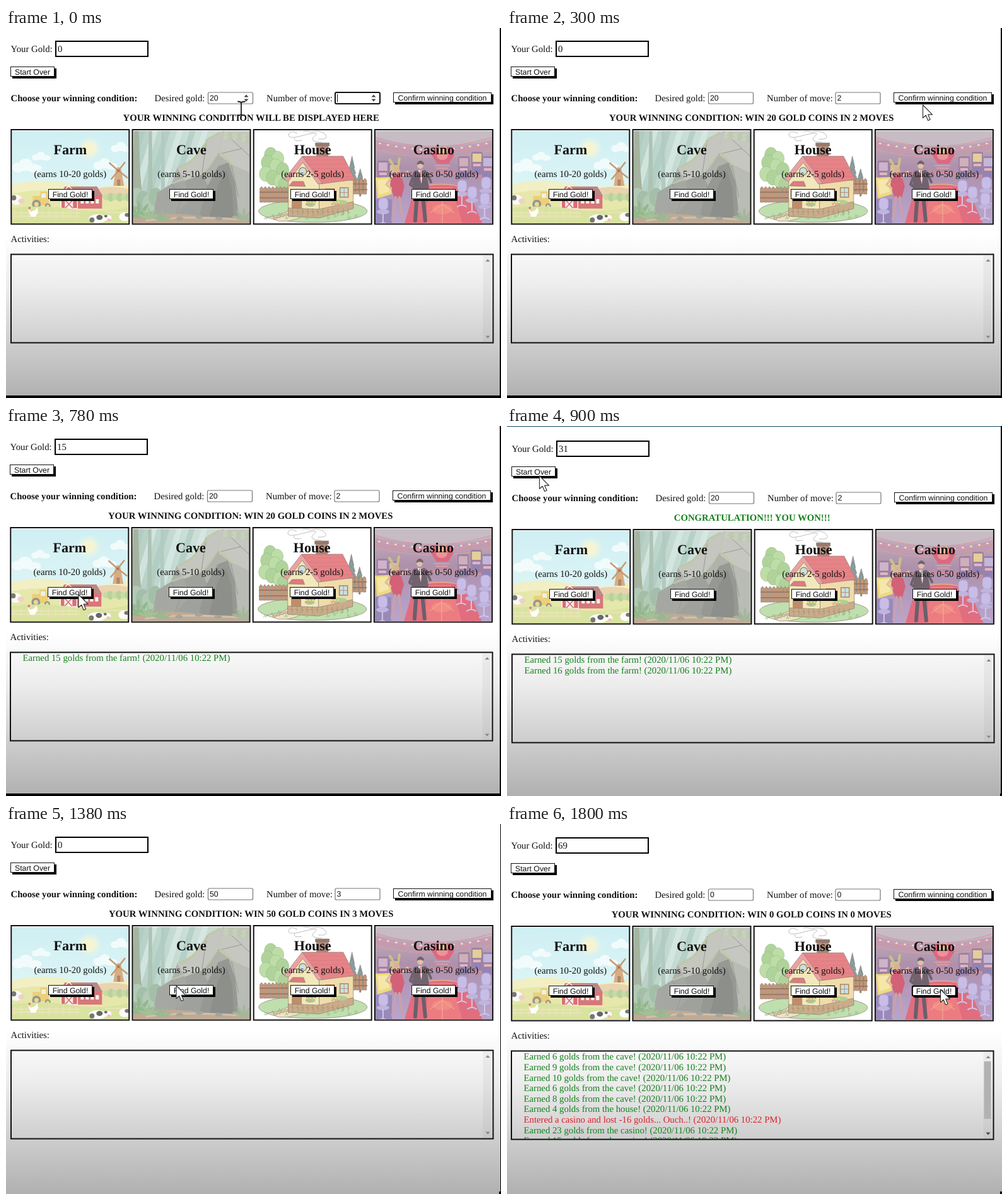
Recreate the animation shown at these times as an HTML page. Size 785 by 586 pixels, loop 2.1 s.

```html
<!DOCTYPE html>
<html lang="en">
<head>
<meta charset="utf-8">
<title>Gold game</title>
<style>
html, body { margin: 0; width: 100%; height: 100%; overflow: hidden; background: #fff; }
svg { display: block; width: 785px; height: 586px; }
text { font: 14.75px "Liberation Serif", Times, serif; fill: #111; text-rendering: geometricPrecision; white-space: pre; }
.b { font-weight: bold; }
.h { font-size: 22.1px; font-weight: bold; }
.ui { font: 12.3px "Liberation Sans", Arial, sans-serif; }
.mid { text-anchor: middle; }
.line { fill: none; stroke-linecap: round; stroke-linejoin: round; }
</style>
</head>
<body>
<svg viewBox="0 0 785 586">
  <defs>
    <linearGradient id="shade" x1="0" y1="0" x2="0" y2="1">
      <stop offset=".56" stop-color="#fff"/><stop offset=".7" stop-color="#ececec"/>
      <stop offset=".85" stop-color="#cecece"/><stop offset="1" stop-color="#b0b0b0"/>
    </linearGradient>
    <linearGradient id="sky" x1="0" y1="0" x2="0" y2="1">
      <stop offset="0" stop-color="#cfeff4"/><stop offset="1" stop-color="#def5f5"/>
    </linearGradient>
    <radialGradient id="sun">
      <stop offset="0" stop-color="#fbf3c4"/><stop offset=".4" stop-color="#f3f5d8"/>
      <stop offset="1" stop-color="#e4f5e8" stop-opacity="0"/>
    </radialGradient>
    <linearGradient id="jungle">
      <stop offset="0" stop-color="#b4cfc4"/><stop offset=".5" stop-color="#cbe0d9"/><stop offset="1" stop-color="#c9d3cb"/>
    </linearGradient>
    <linearGradient id="hall" x1="0" y1="0" x2="0" y2="1">
      <stop offset="0" stop-color="#b3a3b0"/><stop offset=".4" stop-color="#9a7596"/><stop offset="1" stop-color="#a78fc2"/>
    </linearGradient>
    <clipPath id="logClip"><rect x="9" y="359" width="747" height="139"/></clipPath>
    <clipPath id="cardClip"><rect x="2" y="2.5" width="185" height="146.5"/></clipPath>
  </defs>

  <rect width="785" height="586" fill="url(#shade)"/>
  <g id="page">
    <text x="7.5" y="38">Your Gold:</text>
    <rect x="79" y="21" width="146" height="24" fill="#fff" stroke="#000" stroke-width="2"/>
    <text id="gold" x="82" y="38"></text>
    <text class="b" x="7.5" y="115.5">Choose your winning condition:</text>
    <text x="235.5" y="115.5">Desired gold:</text>
    <text x="413" y="115.5">Number of move:</text>
    <rect x="320.5" y="102" width="71" height="18" rx="2" fill="#fff" stroke="#767676" stroke-width="1.2"/>
    <rect id="moveBox" x="522" y="102" width="71" height="18" rx="2" fill="#fff"/>
    <text id="want" class="ui" x="323" y="115.3"></text>
    <text id="moves" class="ui" x="524.5" y="115.3"></text>
    <g id="typing">
      <path d="M525.5 104.5v13" stroke="#111"/>
      <path id="spin" d="M377.5 109.5l3.5-4 3.5 4zM377.5 112.5l3.5 4 3.5-4z" fill="#444"/>
      <use href="#spin" x="202"/>
    </g>
    <text id="goal" class="b mid" x="388.7" y="146.5"></text>
    <g id="cards"></g>
    <g id="buttons"></g>
    <rect id="pressed" x="643.8" y="255.8" width="69" height="15.5" rx="2.5" fill="none" stroke="#000" stroke-width="2"/>
    <text x="7.5" y="339">Activities:</text>
    <rect x="756.5" y="360" width="12.5" height="137" fill="#777" opacity=".09"/>
    <rect id="thumb" x="757.5" y="375" width="11" height="91" fill="#b2b2b2"/>
    <path d="M760.5 370l3.5-4 3.5 4z" fill="#888"/>
    <path id="down" d="M760.5 487.5l3.5 4 3.5-4z"/>
    <g id="log" clip-path="url(#logClip)"></g>
    <rect x="8" y="358.5" width="764.5" height="140" fill="none" stroke="#111" stroke-width="2"/>
  </g>
  <rect id="top" width="785" height="1.2" fill="#2b6079"/>
  <rect id="right" width="2" height="586"/>
  <rect id="bottom" y="582" width="785" height="4"/>
  <rect x="782" y="582" width="3" height="4"/>
  <path id="arrow" d="M0 0V20.5L4.7 16.3 8.2 24.5 11.6 23 8.2 15.2H15z" fill="#fff" stroke="#333" stroke-width="1.2" stroke-linejoin="round"/>
  <path id="beam" class="line" d="M-5-11Q-1-11 0-9Q1-11 6-11M0-9V9M-5 11Q-1 11 0 9Q1 11 6 11" stroke="#222" stroke-width="1.8"/>
</svg>

<script>
const $ = id => document.getElementById(id);
const range = n => [...Array(n).keys()];
const box = (x, y, w, h, fill, more = "") => `<rect x="${x}" y="${y}" width="${w}" height="${h}" fill="${fill}" ${more}/>`;
const oval = (x, y, rx, ry, fill, more = "") => `<ellipse cx="${x}" cy="${y}" rx="${rx}" ry="${ry}" fill="${fill}" ${more}/>`;
const shape = (d, fill, more = "") => `<path d="${d}" fill="${fill}" ${more}/>`;
const line = (d, color, w = 1) => `<path class="line" d="${d}" stroke="${color}" stroke-width="${w}"/>`;
const wash = (art, opacity) => `<g opacity="${opacity}">${art}</g>`;

// Card pictures, drawn from the card's top left corner
function farm() {
  const cloud = (x, y, s) => `<g transform="translate(${x} ${y}) scale(${s})">` +
    oval(0, 0, 9, 7, "#f2fbfb") + oval(11, -4, 10, 9, "#f2fbfb") + oval(23, 1, 11, 6, "#f2fbfb") + "</g>";
  const wheel = (x, y, r) => oval(x, y, r, r, "#96968e") + oval(x, y, r * .5, r * .5, "#ecd896");
  const cow = (x, y) => oval(x, y, 14, 7, "#fcfcfa") + oval(x + 3, y - 2, 5, 4, "#666") +
    oval(x - 9, y + 2, 4, 4, "#777") + oval(x + 17, y - 1, 5, 5, "#fafafa") + oval(x + 18, y + 2, 3, 2.5, "#efc3bd") +
    oval(x + 13, y - 4, 2.5, 2, "#666");
  return box(2, 3, 186, 100, "url(#sky)") + oval(125, 31, 21, 20, "url(#sun)") +
    cloud(12, 61, 1.1) + cloud(40, 45, .7) + cloud(139, 58, .9) + cloud(166, 31, .8) +
    shape("M2 88Q45 76 95 87T188 84V150H2z", "#f1efc3") +
    shape("M2 102Q55 92 105 103T188 99V150H2z", "#e6e7ab") +
    shape("M130 96Q160 88 188 95V110H130z", "#e9d4ae") +
    shape("M163 90L167 63Q171 58 175 63L180 90z", "#d9ad82") + box(169, 80, 5, 10, "#b0866e") +
    [[157, 54], [181, 53], [160, 79], [185, 77]].map(p => line(`M171 66L${p}`, "#c69a74", 2.5)).join("") +
    oval(171, 66, 2, 2, "#9b765d") +
    range(6).map(i => oval(152 + i * 7, 108, 5, 5 + i % 2 * 2, i % 2 ? "#b8d29c" : "#c8daa5")).join("") +
    shape("M78 106L86 91H137L146 106z", "#bd8688") + box(80, 105, 65, 21, "#d8777b") +
    shape("M80 126V104L92 90 106 104V126z", "#d86f74", `stroke="#fff0ef" stroke-width="1.4"`) +
    box(86, 112, 13, 14, "#fbe9e6") + line("M87 113l11 12m0-12l-11 12", "#d06c73", 1.5) +
    range(4).map(i => box(111 + i * 8, 111, 5, 7, "#faf0ea")).join("") +
    shape("M35 106H47V99H58L61 115 57 121H35z", "#edcf78") + box(49, 102, 7, 7, "#e5f3ee") +
    wheel(41, 119, 7) + wheel(59, 122, 4.5) +
    shape("M2 125Q50 119 100 127T188 123V150H2z", "#d9e3a0") +
    line("M2 133H110M2 138H110M150 132H188", "#efe6bd", 1.5) +
    range(10).map(i => box(5 + i * 11, 129, 2.2, 13, "#ece0b9")).join("") +
    oval(9, 112, 9, 8, "#f9f9f6") + oval(5, 109, 4, 4, "#777") + oval(17, 114, 5, 4, "#efd0c8") +
    shape("M28 127l4 4 6-2 4-5 2 7-5 8h-7z", "#fffdf8") + oval(30, 125, 2, 2, "#e57d72") +
    cow(138, 142) + oval(181, 139, 9, 7, "#fbfbfa") + oval(185, 136, 4, 3, "#777");
}

function cave() {
  const leaf = (x, y, s, c) => range(5).map(i => oval(x, y - s, s * .22, s, c, `transform="rotate(${i * 35 - 70} ${x} ${y})"`)).join("");
  return box(2, 3, 186, 147, "url(#jungle)") +
    range(6).map(i => shape(`M${12 + i * 20} 3h9L${i * 19 - 14} 130h-12z`, i % 2 ? "#dcece7" : "#aecbc1", `opacity=".7"`)).join("") +
    shape("M4 3h7l2 60 5 65H2V60z", "#a5b39f") + shape("M27 3h5l1 122h-8z", "#adc3b5") + shape("M47 3h4l2 100h-7z", "#b2cabf") +
    range(8).map(i => oval(8 + i * 10, 108 + i % 3 * 5, 11, 15, i % 2 ? "#a3bfa8" : "#b2cab5")).join("") +
    shape("M33 145L40 101 63 87 72 61 98 47 119 17 145 4H188V148H33z", "#b0b2ac") +
    shape("M72 61L98 47 119 17 145 4 137 40 111 72 84 82z", "#c4c6bf") +
    shape("M145 4H188V70L158 56 137 40z", "#c5c7c0") + shape("M158 56L188 70V145H169z", "#b9bbb5") +
    shape("M40 101L63 87 84 82 91 112 67 143H33z", "#a5a8a2") + shape("M84 82L111 72 125 98 107 139H67L91 112z", "#9fa29c") +
    shape("M107 139L119 92 137 59 153 53 164 85 170 145z", "#969893") +
    shape("M123 139L137 88 150 65 159 93 162 145z", "#8d8f8a") +
    line("M119 17L111 72M63 87L79 109 67 143M137 40L174 31M145 4L174 31 188 44M158 56L169 107", "#969a94", 1) +
    line("M76 60Q88 58 98 47T119 20M122 15L139 6M140 38Q151 48 159 56", "#c0c9a2", 3) +
    line("M65 86L82 79M111 71Q123 62 134 42", "#bdc8a9", 2) +
    range(12).map(i => oval(150 + i % 6 * 7, 7 + i, 5, 3, i % 2 ? "#bdc9b0" : "#c8d0bc")).join("") +
    shape("M2 139Q60 130 105 138T188 139V150H2z", "#bfaa95") + line("M23 145Q85 136 180 144", "#d0c0aa", 3) +
    range(5).map(i => oval(45 + i * 31, 139 + i % 2 * 3, 6, 3, "#a4a59b")).join("") +
    leaf(11, 140, 13, "#92b78b") + leaf(27, 142, 9, "#a2c197") + leaf(48, 145, 8, "#9ab893") + leaf(178, 145, 10, "#a4b79a");
}

function house() {
  const ink = `stroke="#8a8074" stroke-width=".7" stroke-linejoin="round"`;
  const fence = (x, y, n) => range(n).map(i => shape(`M${x + i * 6} ${y + 25}v-22l2.5-3 2.5 3v22z`, "#c49778", ink)).join("") +
    line(`M${x} ${y + 9}h${n * 6}m0 9h${-n * 6}`, "#96705c", 1.3);
  const fir = (x, y, h) => range(4).map(i => shape(`M${x} ${y + i * h / 6}l${4 + i * 2} ${h / 3}h${-8 - i * 4}z`, "#86a4a8", ink)).join("") +
    box(x - 1.5, y + h * .83, 3, 8, "#9c8070");
  const pane = (x, y, w, h) => box(x, y, w, h, "#c3e3e7", `stroke="#b18460" stroke-width="1.5"`) +
    line(`M${x + w / 2} ${y}v${h}M${x} ${y + h / 2}h${w}`, "#b18460", .8);
  return box(2, 2, 186, 147, "#fff") +
    oval(95, 130, 86, 18, "#c0dfae", ink) +
    range(9).map(i => oval([28, 39, 23, 36, 47, 20, 31, 43, 50][i], 41 + i * 6, 10, 12, i % 2 ? "#bddda7" : "#b0d39b", `stroke="#93b385" stroke-width=".5"`)).join("") +
    fir(157, 43, 55) + fir(170, 63, 43) + fence(11, 91, 8) + fence(145, 78, 6) +
    shape("M22 140Q55 135 66 121L91 128Q72 148 42 146z", "#efe3c2", ink) +
    range(8).map(i => oval(35 + i * 6, 141 - i * 1.9, 3, 1.6, "#dfcfaa", ink)).join("") +
    shape("M101 24h18v27h-18z", "#b98f7d", ink) + box(99, 22, 22, 5, "#99786c", ink) +
    line("M101 34h18m-18 7h18m-9-14v7m5 0v7", "#8d7164", .7) +
    line("M109 21Q87 20 98 11T76 11Q53 17 57 7 61 1 70 7M104 16Q121 17 115 9T92 5Q84 2 80 4M66 14Q63 21 77 18", "#b4b6b8", .9) +
    shape("M56 138V78L78 48 105 82V140z", "#f3e8bb", ink) + shape("M105 140V81H159V125z", "#efdcab", ink) +
    shape("M78 43H143L162 80 107 87z", "#e58488", ink) +
    shape("M78 43L49 80 56 83 79 53 103 87 110 86z", "#eba1a2", ink) +
    range(5).map(i => line(`M${84 + i * 5} ${49 + i * 7}L${145 + i * 3.6} ${49 + i * 6.5}`, "#d8727a", .6)).join("") +
    oval(79, 67, 6, 6, "#c3e3e7", `stroke="#b18460" stroke-width="1.6"`) +
    box(62, 96, 15, 32, "#c18d69", ink) + box(65, 100, 9, 10, "#b2d5da", ink) +
    shape("M57 90L63 83H80L83 91z", "#df7a80", ink) + pane(85, 98, 14, 17) + pane(115, 95, 14, 16) + pane(138, 93, 13, 15) +
    shape("M56 125L105 127 159 115V126L105 141 56 138z", "#cbac8a", ink) +
    range(12).map(i => line(`M${60 + i * 8} 130l5 2m-2-6v10`, "#a5896c", .7)).join("") +
    oval(91, 119, 8, 4, "#a8cb92") + oval(137, 116, 13, 4, "#b0cf94") +
    range(11).map(i => oval(86 + i % 3 * 5 + (i > 4 ? 40 : 0), 116 + i % 2 * 3, 1.5, 1.5, i % 2 ? "#e9989d" : "#f2dc84")).join("") +
    range(14).map(i => line(`M${18 + i * 11} ${143 - i % 3 * 3}l2-5 1 5 3-4`, "#8fb983", .8)).join("");
}

function casino() {
  const machine = (x, y, c) => box(x, y, 18, 36, "#85658e", `rx="3"`) + box(x + 2, y + 3, 14, 13, c) +
    box(x + 3, y + 19, 12, 4, "#d9a4b4") + box(x + 3, y + 26, 12, 7, "#7666a6");
  const chair = (x, y) => box(x, y, 15, 19, "#b9ade0", `rx="6" stroke="#9a8cc4"`) + oval(x + 7, y + 22, 10, 4, "#afa2d6") +
    line(`M${x + 7} ${y + 25}v14m-7 3q7-5 14 0`, "#c6bae4", 2);
  return wash(box(2, 3, 186, 147, "url(#hall)") +
    shape("M2 3H188V16Q97 40 2 15z", "#b9acb5") + shape("M2 18Q95 46 188 18V30Q95 52 2 31z", "#b5839b") +
    line("M2 13Q95 42 188 13M2 21Q95 49 188 21", "#cd8297", 1.5) + line("M2 33Q97 56 188 33", "#c9858c", 1.5) +
    range(14).map(i => oval(9 + i * 13, 23 + 10 * Math.sin(i * Math.PI / 13), 2, 1.3, "#ead8c4")).join("") +
    shape("M66 88H145L172 150H48z", "#d94a5f") + shape("M88 92H123L140 150H80z", "#e85c62") +
    line("M2 78Q97 62 188 77", "#c87183", 3) + line("M69 93Q105 82 146 93", "#e89a6c", 1.5) +
    oval(108, 127, 16, 8, "#ee7167") + line("M108 97V150M89 133L108 119 127 133", "#f0a27f", 1) +
    shape("M96 29h26l5 12-9 14H100l-9-14z", "#d4445f") + oval(108, 42, 9, 7, "#e57980") +
    shape("M100 34l4-6 4 5 5-6 4 7-2 4h-13z", "#eab97d") + line("M96 58H120M99 62H117", "#d98289", 2) +
    [[5, 50, "#c3a0bd"], [23, 54, "#cfae85"], [133, 43, "#c49ba9"], [154, 36, "#dfc27e"], [171, 43, "#b4a6d2"]].map(a => machine(...a)).join("") +
    shape("M2 77L25 76 28 103 5 110z", "#ecd061") + shape("M5 80L22 79 24 99 8 104z", "#f3e294") + shape("M2 111H28V150H2z", "#7f6ca8") +
    chair(7, 109) + chair(132, 81) + chair(148, 91) + chair(170, 76) + chair(168, 101) +
    line("M33 62L25 49M38 61L40 47", "#bfb268", 4) + oval(36, 66, 5, 6, "#cf9f7b") +
    shape("M29 72L42 71 48 91 43 109 32 109 25 88z", "#c83a55") + line("M29 75L19 88 27 94M43 76L53 67", "#d6aa8e", 3) +
    line("M34 108L29 144M40 108L45 144", "#b98a98", 4) +
    oval(73, 57, 5, 6, "#d9b096") + shape("M68 54q5-8 11 0l-1 3q-5-4-10 0z", "#4e3c46") +
    shape("M64 66L82 65 87 92 81 105 64 106 60 89z", "#4d3d4a") + shape("M70 65h7l-2 22z", "#f6eeee") + line("M73 66v15", "#c83b50", 1.5) +
    line("M64 69L57 88 65 94M83 69L90 84", "#4b3b48", 4) + line("M68 104L65 145M77 104L81 145", "#463745", 6), .8);
}

const places = [
  ["Farm", "(earns 10-20 golds)", farm],
  ["Cave", "(earns 5-10 golds)", cave],
  ["House", "(earns 2-5 golds)", house],
  ["Casino", "(earns takes 0-50 golds)", casino]
];
const button = (x, y, w, label) => box(x + 3, y + 3, w, 16, "#000") +
  box(x, y, w, 16, "#111") + box(x + 1, y + 1, w - 2, 14, "#fff") +
  `<text class="ui mid" x="${x + w / 2}" y="${y + 13}">${label}</text>`;

$("cards").innerHTML = places.map(([name, note, art], i) =>
  `<g transform="translate(${7.3 + i * 192.2} 160)"><g clip-path="url(#cardClip)">${art()}</g>` +
  box(1, 1, 187, 149.5, "none", `stroke="#111" stroke-width="2"`) +
  `<text class="h mid" x="94.5" y="39.5">${name}</text><text class="mid" x="94.5" y="76.3">${note}</text></g>`).join("");
$("buttons").innerHTML = button(7, 61, 70, "Start Over") + button(614, 102, 156, "Confirm winning condition") +
  places.map((p, i) => button(Math.round(66.6 + i * 192.2), 255, 70, "Find Gold!")).join("");

const stamp = " (2020/11/06 10:22 PM)";
const won = (n, place) => ["#15801c", `Earned ${n} golds from the ${place}!${stamp}`];
const lost = n => ["#dc2028", `Entered a casino and lost -${n} golds... Ouch..!${stamp}`];
const goal = (n, m) => `YOUR WINNING CONDITION: WIN ${n} GOLD COINS IN ${m} MOVES`;
const history = [won(6, "cave"), won(9, "cave"), won(10, "cave"), won(6, "cave"), won(8, "cave"),
  won(4, "house"), lost(16), won(23, "casino"), won(15, "casino")];

// at: page offset, tip: pointer position, edge: left side of the dark right border
const steps = [
  { at: [0, 0], tip: [373, 127.5], edge: 783, gold: 0, want: 20, moves: "", goal: "YOUR WINNING CONDITION WILL BE DISPLAYED HERE", log: [] },
  { at: [-1, 0], tip: [659.5, 122], edge: 783, gold: 0, want: 20, moves: 2, goal: goal(20, 2), log: [] },
  { at: [-1, 0], tip: [115, 267], edge: 783, gold: 15, want: 20, moves: 2, goal: goal(20, 2), log: [won(15, "farm")] },
  { at: [0, 3], tip: [51.5, 79], edge: 783, gold: 31, want: 20, moves: 2, goal: "CONGRATULATION!!! YOU WON!!!", log: [won(15, "farm"), won(16, "farm")] },
  { at: [0, 0], tip: [270, 256], edge: 784, gold: 0, want: 50, moves: 3, goal: goal(50, 3), log: [] },
  { at: [0, 0], tip: [203.5, 275], edge: 785, gold: -19, want: 50, moves: 3, goal: goal(50, 3), log: [won(10, "cave"), lost(29)] },
  { at: [-1, 1], tip: [687.5, 262], edge: 785, gold: 69, want: 0, moves: 0, goal: goal(0, 0), log: history }
];
const hold = 300;
const show = (id, on) => { $(id).style.display = on ? "" : "none"; };
const move = (id, [x, y]) => $(id).setAttribute("transform", `translate(${x} ${y})`);

function render(i) {
  const s = steps[i], typing = i === 0, full = s.log === history;
  move("page", s.at);
  move("arrow", s.tip);
  move("beam", s.tip);
  move("right", [s.edge, 0]);
  for (const id of ["gold", "want", "moves", "goal"]) $(id).textContent = s[id];
  $("goal").style.fill = i === 3 ? "#15801c" : "";
  $("log").innerHTML = s.log.map(([color, words], n) =>
    `<text x="27.5" y="${372.3 + n * 16.6}" style="fill:${color}">${words}</text>`).join("");
  $("moveBox").setAttribute("stroke", typing ? "#111" : "#767676");
  $("moveBox").setAttribute("stroke-width", typing ? 2 : 1.2);
  $("down").setAttribute("fill", full ? "#444" : "#888");
  show("typing", typing);
  show("beam", typing);
  show("arrow", !typing);
  show("pressed", full);
  show("thumb", full);
  show("top", i === 3);
  show("bottom", i < 3);
}

let shown = -1;
function tick() {
  const i = Math.floor(performance.now() / hold) % steps.length;
  if (i !== shown) render(shown = i);
  requestAnimationFrame(tick);
}
tick();
</script>
</body>
</html>
```
